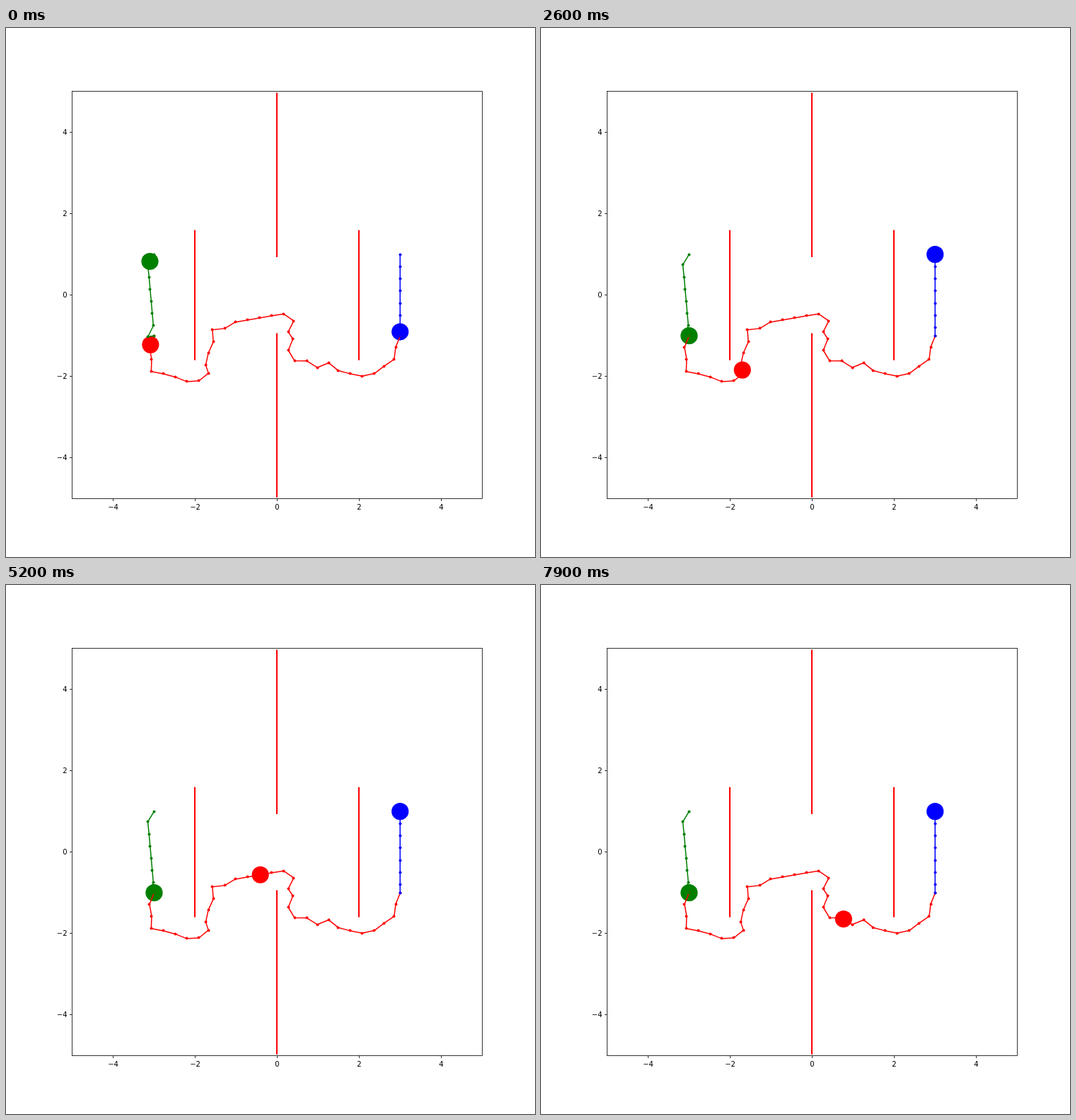
An HTML page for the animation above (8 s loop, 748x748 px).

```html
<!DOCTYPE html>
<html>
<head>
<meta charset="utf-8">
<style>
html, body { margin: 0; width: 100%; height: 100%; overflow: hidden; background: #fff; }
svg { display: block; width: 748px; height: 748px; }
text { font: 10px "DejaVu Sans", sans-serif; }
</style>
</head>
<body>
<svg id="stage" viewBox="0 0 748 748"></svg>
<script>
const stage = document.getElementById('stage');
const px = x => 383.35 + 57.97 * x;
const py = y => 377.74 - 57.6 * y;
const pixelCenter = v => Math.floor(v) + 0.5;

function add(tag, attrs, text) {
  const el = document.createElementNS('http://www.w3.org/2000/svg', tag);
  for (const key in attrs) el.setAttribute(key, attrs[key]);
  if (text) el.textContent = text;
  stage.appendChild(el);
  return el;
}

// A route is walked leg by leg: heading in degrees, or [heading, length].
// Its ball starts `offset` pixels along and advances `speed` pixels per step.
const routes = [
  { color: 'red', from: [-3, -1], offset: 13.5, speed: 5,
    legs: [-112, -80, -92, -11, -15, -22, 3, 39, [108, 0.21], 78, 66, 94, 6, 31, 10, 10, 10, 9,
      -35, -117, [-57, 0.21], -112, -59, -1, -32, 22, -39, -15, -11, 12, 37, 35, 83, 68] },
  { color: 'green', from: [-3, 1], offset: 11.5, speed: 4.65,
    legs: [-121, -84, -85, -85, -85, -85, -116, [9, 0.152]] },
  { color: 'blue', from: [3, -1], offset: 5.8, speed: 5.76,
    legs: [[90, 0.2], ...Array(6).fill(90)] }
];

function walk([x, y], legs) {
  const points = [[px(x), py(y)]];
  for (const leg of legs) {
    const [heading, length = 0.3] = [].concat(leg);
    const angle = heading * Math.PI / 180;
    x += length * Math.cos(angle);
    y += length * Math.sin(angle);
    points.push([px(x), py(y)]);
  }
  return points;
}

for (const route of routes) route.ball = add('circle', { r: 12.1, fill: route.color });

for (const route of routes) {
  const points = walk(route.from, route.legs);
  route.line = add('polyline', { points: points.join(' '), fill: 'none', stroke: route.color,
    'stroke-width': 1.5, 'stroke-linejoin': 'round', 'stroke-linecap': 'square' });
  for (const [x, y] of points)
    add('circle', { cx: pixelCenter(x), cy: pixelCenter(y), r: 2, fill: route.color });
}

function wall(x, top, bottom) {
  add('path', { d: `M${Math.round(px(x))} ${py(top)}V${py(bottom)}`,
    stroke: 'red', 'stroke-width': 2, 'stroke-linecap': 'square' });
}
wall(0, 4.95, 0.95);
wall(0, -0.95, -4.95);
wall(-2, 1.58, -1.58);
wall(2, 1.58, -1.58);

const ink = { fill: 'none', stroke: '#000', 'stroke-width': 0.8 };
add('rect', { x: 93.5, y: 89.5, width: 580, height: 576, ...ink });
for (let n = -4; n <= 4; n += 2) {
  const x = 383.5 + 58 * n, y = 377.5 - 57.5 * n;
  const label = String(n).replace('-', '\u2212');
  add('path', { d: `M${x} 665.5v3.5M93.5 ${y}h-3.5`, ...ink });
  add('text', { x, y: 681, 'text-anchor': 'middle' }, label);
  add('text', { x: 86.5, y: y + 3.5, 'text-anchor': 'end' }, label);
}

const start = performance.now();
function draw() {
  const step = Math.floor((performance.now() - start) % 8000 / 100);
  for (const { ball, line, offset, speed } of routes) {
    const { x, y } = line.getPointAtLength(offset + speed * step);
    ball.setAttribute('cx', x);
    ball.setAttribute('cy', y);
  }
  requestAnimationFrame(draw);
}
draw();
</script>
</body>
</html>
```
